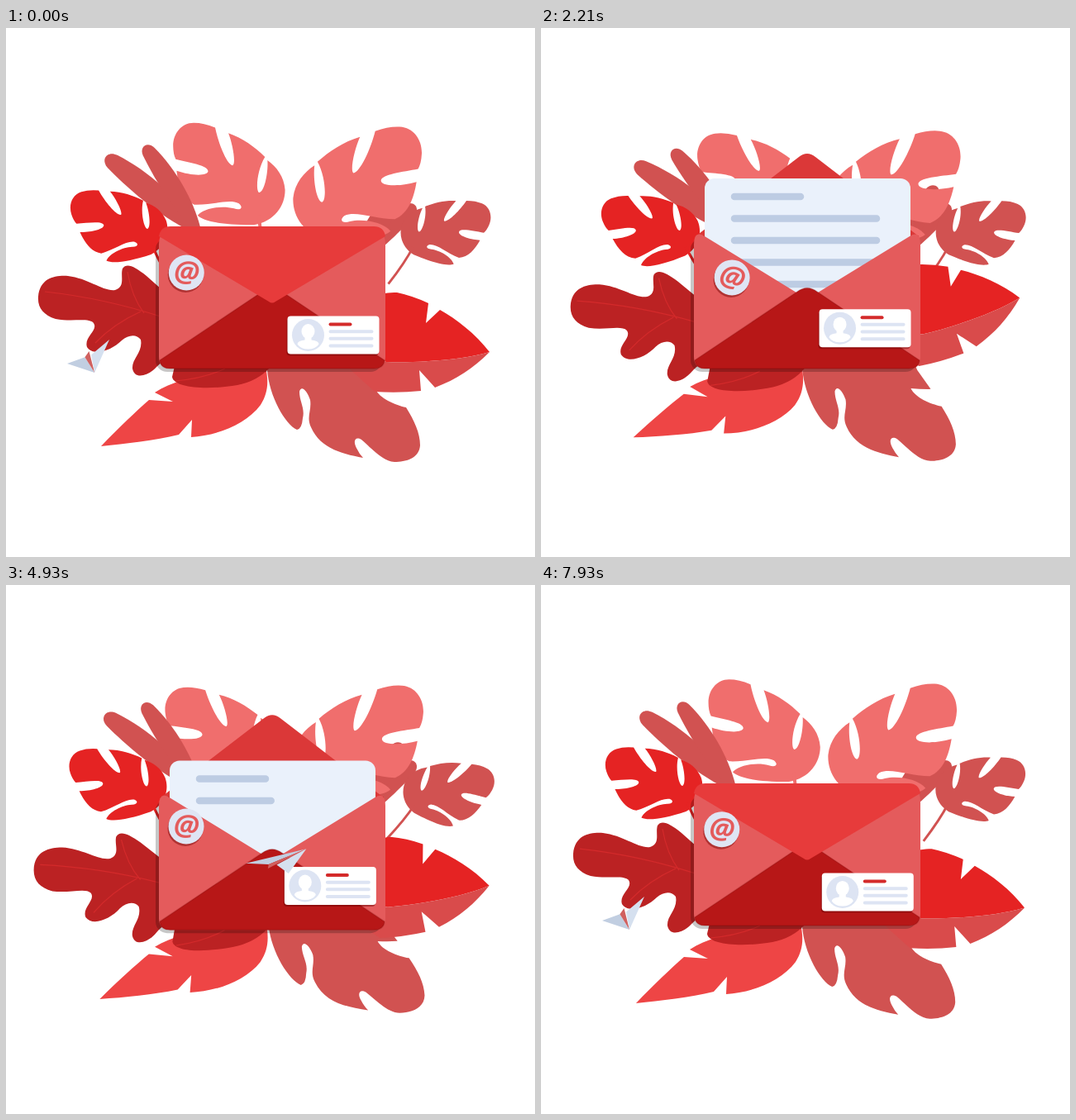
Animation, 640 px wide and 640 px high, one loop 8 s. Source, as an HTML page:

```html
<!DOCTYPE html>
<html lang="en">
<head>
<meta charset="utf-8">
<title>Letter among leaves</title>
<style>
  html, body { margin: 0; height: 100%; overflow: hidden; background: #fff; }
  svg { display: block; width: 100%; height: 100%; fill: currentColor; }
  .pink { color: #f06e6d; }
  .red { color: #e52323; }
  .brick { color: #d15251; }
  .dark { color: #bb2223; }
  .vein { fill: none; stroke: #d42a2b; stroke-width: 1.2; }
  .rule { fill: none; stroke-linecap: round; }
  text { font: italic 700 35px "Open Sans", "Noto Sans", sans-serif; fill: #e45b5c; text-anchor: middle; }
</style>
</head>
<body>
<svg viewBox="0 0 640 640">
  <defs>
    <g id="monstera">
      <path d="M254,120Q240,114 228,114C213,114 203,127 203,142Q203,152 206,158C222,162 246,166 245,173C244,179 224,178 207,172C209,190 214,206 228,213C250,214 270,206 282,212C288,217 284,221 276,218C262,214 240,217 232,226C240,234 265,238 300,238C325,234 338,215 338,196C337,180 328,168 317,160C318,175 313,198 307,199C302,198 304,172 314,156C302,144 287,133 270,127C275,140 279,163 275,166C268,165 258,140 254,120Z"/>
      <path fill="none" stroke="currentColor" stroke-width="4" d="M306,226Q308,255 320,300"/>
    </g>
    <path id="blade" d="M-3,2C-14,-40 -12,-90 -9,-118C-7,-131 6,-131 9,-119C18,-80 16,-35 5,0Z"/>
  </defs>

  <g id="topLeft" class="pink"><use href="#monstera"/></g>
  <g id="blades" class="brick">
    <use href="#blade" transform="translate(226 243) rotate(-50) scale(1.07)"/>
    <use href="#blade" transform="translate(231 243) rotate(-32) scale(.93)"/>
  </g>
  <g class="brick">
    <use href="#blade" transform="translate(400 300) rotate(48) scale(-1 1)"/>
    <use href="#blade" transform="translate(414 302) rotate(30) scale(-1 1)"/>
  </g>
  <g id="topRight" class="pink">
    <use href="#monstera" transform="translate(426 174) rotate(3) scale(-1.13 1.13) translate(-270 -164.5)"/>
  </g>
  <g id="left" class="red">
    <use href="#monstera" transform="translate(135 226) rotate(-18) scale(.79) translate(-270 -164.5)"/>
  </g>
  <g id="right" class="brick">
    <use href="#monstera" transform="translate(533 233) rotate(22) scale(-.72 .72) translate(-270 -164.5)"/>
  </g>
  <path id="lowRight" class="brick" d="M316,413L330,380H440L455,415L471,438Q458,438 447,437C452,448 470,456 484,459C494,475 501,490 501,505C500,520 485,525 470,525C455,524 442,508 430,498C423,494 420,499 423,506Q427,515 432,520C405,515 380,508 369,483C363,470 370,463 368,450C364,438 357,432 355,440C355,452 362,460 359,472Q358,485 352,486C338,480 318,445 316,413Z"/>
  <g id="spear">
    <path class="red" d="M400,345C430,325 455,320 473,320Q492,324 511,333L508,357L525,341C545,352 568,370 585,392C550,402 500,405 460,404L380,380Z"/>
    <path fill="#d94b4b" d="M585,392C565,412 545,425 519,435L500,414L502,439Q475,442 446,440L380,380L460,404C500,405 550,402 585,392Z"/>
  </g>
  <path id="lowLeft" fill="#ee4545" d="M115,506C135,485 158,463 173,450L202,452L180,441C200,428 230,420 260,415L314,410C318,428 317,442 308,456C290,480 255,493 224,495L225,474L209,492C180,499 145,503 115,506Z"/>
  <g id="oak" class="dark">
    <path d="M39,325C41,302 60,299 75,300C100,303 118,319 132,317C145,313 138,300 141,291C146,284 155,288 170,300L260,380L200,400C190,400 185,408 178,414C168,422 155,424 153,412C152,400 166,392 163,377C158,370 148,371 140,378C128,390 106,398 98,386C94,374 112,366 106,357C100,350 80,356 60,352C45,347 38,338 39,325Z"/>
    <path d="M201,422C203,436 245,438 280,432Q305,427 320,410L205,405Z"/>
    <path class="vein" d="M47,319Q120,327 190,350M147,295Q152,325 167,345M108,381Q130,358 163,343M205,427Q240,424 265,412"/>
  </g>

  <g id="envelope">
    <rect x="181" y="254" width="274" height="162" rx="14" fill="#000" opacity=".22"/>
    <path id="backFlap" fill="#db3838"/>
    <path fill="#c22525" d="M187,251H457V400H187Z"/>
    <g id="letter">
      <rect x="198" y="182" width="249" height="165" rx="12" fill="#eaf1fb"/>
      <path id="lines" class="rule" stroke="#bdcce3" stroke-width="8.5"/>
    </g>
    <path fill="#e45b5c" d="M185,262Q185,244 198,252L322,328L446,252Q459,244 459,262V398Q459,412 445,412H199Q185,412 185,398Z"/>
    <path fill="#b71717" stroke="#700" stroke-opacity=".25" stroke-width="1.5" d="M186,402L310,319Q322,310 334,319L458,402Q457,412 445,412H199Q187,412 186,402Z"/>
    <path id="frontFlap" fill="#e73b3b"/>
  </g>

  <g id="card">
    <rect x="-1" y="2" width="111" height="46" rx="4" fill="#600" opacity=".45"/>
    <rect width="111" height="46" rx="4" fill="#fff"/>
    <circle cx="25" cy="23" r="19.5" fill="#dde4f3"/>
    <g fill="#fff">
      <ellipse cx="25" cy="18.5" rx="8" ry="9"/>
      <path d="M21,24H29V29Q38,30 38,34Q34,40 25,40Q16,40 12,34Q12,30 21,29Z"/>
    </g>
    <path class="rule" stroke="#d42a2a" stroke-width="4" d="M52,10H76"/>
    <path class="rule" stroke="#dde4f3" stroke-width="4" d="M52,18.7H102M52,27.3H102M52,36H102"/>
  </g>
  <g id="stamp">
    <circle cx="-1" cy="2.5" r="21.5" fill="#811" opacity=".55"/>
    <circle r="21.5" fill="#dfe5f4"/>
    <text id="sign" y="11">@</text>
  </g>
  <g id="plane">
    <path id="wingA" fill="#c1cee1"/>
    <path id="keel" fill="#d0605f"/>
    <path id="wingB" fill="#d5e0ef"/>
  </g>
</svg>
<script>
const LOOP = 8000, CYCLE = 4000, TURN = 2 * Math.PI / LOOP;
const set = (id, name, value) => document.getElementById(id).setAttribute(name, value);
const clamp = u => Math.min(1, Math.max(0, u));
const ramp = (t, from, to) => {
  const u = clamp((t - from) / (to - from));
  return u * u * (3 - 2 * u);
};
const mix = (p, q, k) => p.map((v, i) => v + (q[i] - v) * k);

// Swings 0, 1, 0, 1 ... turning at the given times
function swing(turns, t) {
  if (t < turns[0]) t += LOOP;
  const i = turns.findLastIndex(turn => turn <= t);
  const u = ramp(t, turns[i], turns[i + 1] ?? turns[0] + LOOP);
  return i % 2 ? 1 - u : u;
}

const leaf = (id, x, y, from, to, turns, hold = 1) => ({ id, x, y, from, to, turns, hold });
const leaves = [
  leaf('topLeft', 320, 251, 0, -9, [3740, 5740, 7740, 9740]),
  leaf('topRight', 382, 239, 0, 3.1, [50, 2050, 4050, 6050]),
  leaf('blades', 231, 257, 0, -4.9, [0, 1600, 4300, 6900]),
  leaf('left', 198, 290, 0, -4.8, [0, 1650, 4100, 6700]),
  leaf('right', 478, 280, -3.4, 6.6, [2950, 4800, 6800, 9400]),
  leaf('lowRight', 305, 372, 0, -8.9, [0, 1250, 2350, 3850, 5500, 6800]),
  leaf('spear', 335, 381, 0, -15.2, [0, 1850, 4000, 6900], 2),
  leaf('lowLeft', 302, 442, 0, 3.7, [0, 1700, 4000, 6100]),
  leaf('oak', 350, 420, 0, -3.8, [0, 1400, 3150, 5200])
];

function drawLeaves(t) {
  for (const { id, x, y, from, to, turns, hold } of leaves) {
    const k = 1 - (1 - swing(turns, t)) ** hold;
    set(id, 'transform', `rotate(${from + (to - from) * k} ${x} ${y})`);
  }
}

function drawEnvelope(t) {
  const open = ramp(t, 300, 700) - ramp(t, 3260, 3620);
  const lift = ramp(t, 650, 1150) - ramp(t, 2780, 3280);
  const dip = 10 * (ramp(t, 700, 1150) - ramp(t, 1150, 1550))
    + 8 * (ramp(t, 2850, 3250) - ramp(t, 3250, 3600));
  set('envelope', 'transform', `translate(0 ${dip})`);
  set('letter', 'transform', `translate(0 ${62 * (1 - lift)})`);

  // The lines are written one after another
  let lines = '';
  for (let i = 0; i < 5; i++) {
    const written = ramp(t, 650 + 187 * i, 837 + 187 * i);
    if (written) lines += `M234,${204 + 26.5 * i}h${(i ? 172 : 80) * written}`;
  }
  set('lines', 'd', lines);

  const tip = 333 - 182 * open, raised = tip < 250, top = 240 + 10 * clamp(open * 2);
  set('backFlap', 'd', raised ? `M187,252L312,${tip + 5}Q322,${tip - 3} 332,${tip + 5}L457,252Z` : '');
  set('frontFlap', 'd', raised ? ''
    : `M185,252Q187,${top} 199,${top}H445Q457,${top} 459,252L326,${tip - 2}Q322,${tip + 1} 318,${tip - 2}Z`);
}

function drawStickers(t) {
  const a = t * TURN;
  const x = 218 + 14 * swing([100, 1700, 5000, 6900], t), y = 296 + 6 * Math.sin(a);
  set('stamp', 'transform', `translate(${x} ${y})`);
  set('sign', 'transform', `rotate(${6 + (x - 218) * 1.1})`);
  set('card', 'transform',
    `translate(${340.5 + 4.5 * Math.sin(3 * a)} ${343 + 3 * Math.cos(a) + 2.5 * Math.cos(2 * a)})`);
}

// Time, nose, far wing tip, near wing tip
const poses = [
  [0, [107, 417], [74, 406], [125, 377]],
  [210, [142, 408], [73, 416], [124, 377]],
  [1210, [449, 285], [374, 306], [426, 338]],
  [1640, [515, 241], [463, 272], [529, 261]]
];

function drawPlane(t) {
  const size = ramp(t, 3400, 3750) + 1 - ramp(t, 1640, 2000);
  set('plane', 'display', size ? 'inline' : 'none');
  if (t > 3000) t = 0;
  const i = Math.min(poses.findLastIndex(pose => pose[0] <= t), poses.length - 2);
  const [start, ...from] = poses[i], [end, ...to] = poses[i + 1];
  const [nose, tipA, tipB] = from.map((p, j) => mix(p, to[j], (t - start) / (end - start)));
  const far = mix(nose, tipA, size), near = mix(nose, tipB, size);
  const fold = (across, along) => mix(mix(far, near, across), nose, along);
  const shape = (id, ...points) => set(id, 'd', `M${points.join('L')}Z`);
  shape('wingA', nose, far, fold(.38, .15));
  shape('keel', nose, fold(.38, .15), fold(.52, 0));
  shape('wingB', nose, fold(.55, .2), near);
}

const begin = performance.now();
function tick() {
  const t = (performance.now() - begin) % LOOP;
  drawLeaves(t);
  drawEnvelope(t % CYCLE);
  drawStickers(t);
  drawPlane(t % CYCLE);
  requestAnimationFrame(tick);
}
tick();
</script>
</body>
</html>
```
